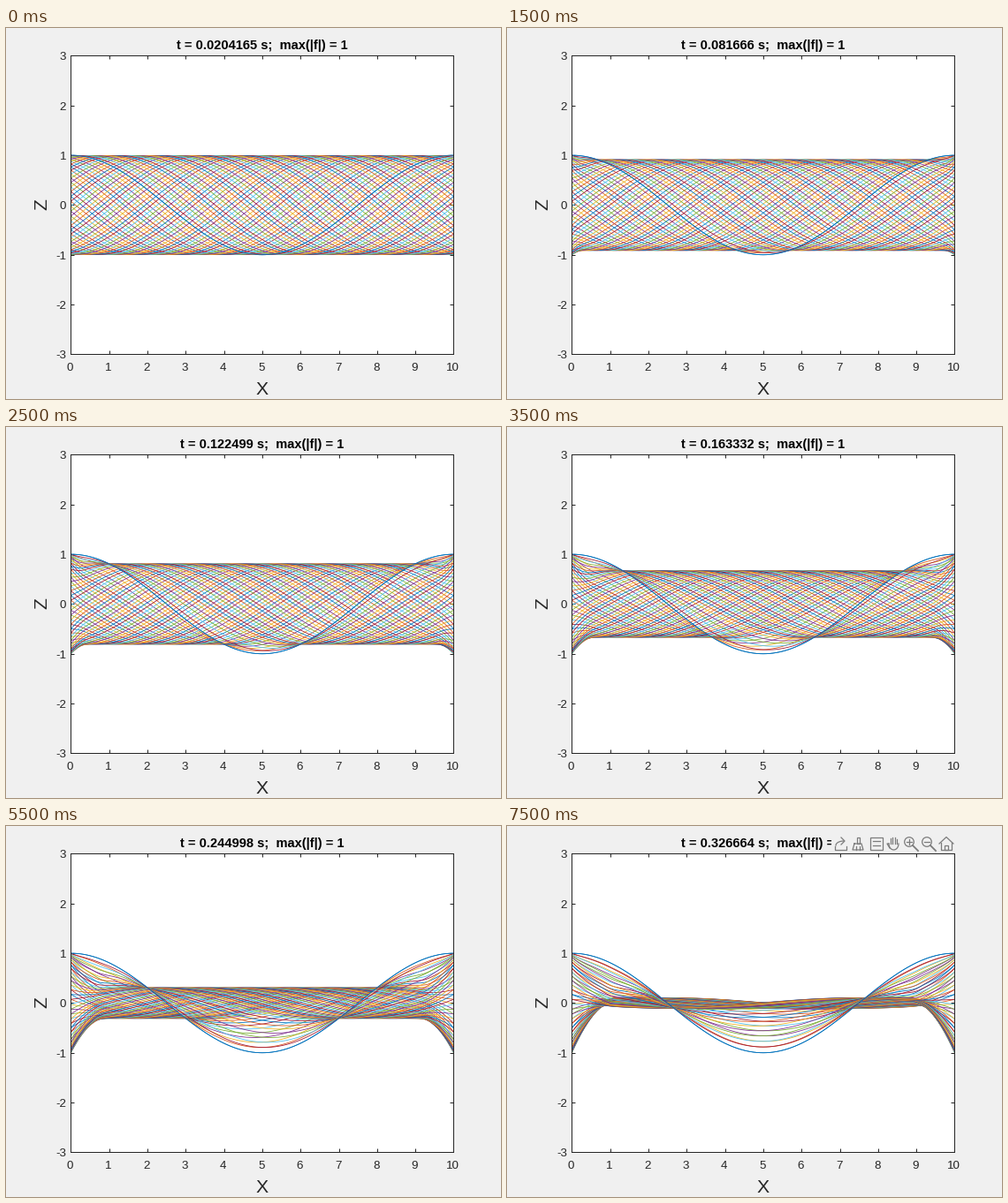
Recreate the animation shown at these times as a matplotlib script. Size 560 by 420 pixels, loop 8000 ms.

```python
import numpy as np
import matplotlib.pyplot as plt
from matplotlib.animation import FuncAnimation
from matplotlib.collections import LineCollection
from matplotlib.patches import Circle, Rectangle

W, H = 560, 420
FRAMES, INTERVAL = 16, 500
DT = 50 / 2449          # time between shown states
SUBSTEPS = 10
SPEED = np.sqrt(40 / 3)
LX, LY = 10, 5
NX, NY = 121, 64
LEFT, RIGHT, TOP, BOTTOM = 73.4, 506.4, 31.4, 369.4
INK, ICON, BACK = "#262626", "#7c7c7c", "#f0f0f0"
COLORS = ["#0072BD", "#D95319", "#EDB120", "#7E2F8E",
          "#77AC30", "#4DBEEE", "#A2142F"]

plt.rcParams["font.family"] = "Liberation Sans"


def solve():
    """Plane wave on a membrane whose rim is held at its starting shape."""
    x = np.linspace(0, LX, NX)
    y = np.linspace(0, LY, NY)
    f = np.cos(2 * np.pi * (x[None, :] / LX + y[:, None] / LY))
    step = SPEED * DT / SUBSTEPS
    ax2 = (step / (x[1] - x[0])) ** 2
    ay2 = (step / (y[1] - y[0])) ** 2

    def bend(g):
        mid = g[1:-1, 1:-1]
        return (ax2 * (g[1:-1, 2:] - 2 * mid + g[1:-1, :-2])
                + ay2 * (g[2:, 1:-1] - 2 * mid + g[:-2, 1:-1]))

    old, now = f, f.copy()
    now[1:-1, 1:-1] += bend(f) / 2
    states = []
    for i in range(1, FRAMES * SUBSTEPS + 1):
        if i % SUBSTEPS == 0:
            states.append(now)
        new = now.copy()
        new[1:-1, 1:-1] += now[1:-1, 1:-1] - old[1:-1, 1:-1] + bend(now)
        old, now = now, new
    return x, states


x, states = solve()

fig = plt.figure(figsize=(W / 100, H / 100), dpi=100, facecolor=BACK)
ax = fig.add_axes([LEFT / W, 1 - BOTTOM / H, (RIGHT - LEFT) / W, (BOTTOM - TOP) / H])
ax.set(xlim=(0, 10), ylim=(-3, 3), xticks=range(11), yticks=range(-3, 4))
ax.tick_params(direction="in", top=True, right=True, length=3.1, width=0.72,
               color=INK, labelbottom=False, labelleft=False)
for spine in ax.spines.values():
    spine.set(color=INK, linewidth=0.72)

waves = LineCollection([], colors=COLORS, linewidths=0.58, zorder=2)
ax.add_collection(waves, autolim=False)

# Overlay in pixel units for text and toolbar
page = fig.add_axes([0, 0, 1, 1], zorder=5)
page.set(xlim=(0, W), ylim=(H, 0))
page.axis("off")


def label(px, py, text, size, ha="center", color=INK, va="baseline", **kw):
    return page.text(px, py, text, fontsize=size * 0.72, ha=ha, va=va,
                     color=color, **kw)


for v in range(11):
    label(LEFT + (RIGHT - LEFT) * v / 10 - 0.9, 388, str(v), 13.33)
for v in range(-3, 4):
    label(68.2, TOP + (BOTTOM - TOP) * (3 - v) / 6 + 5, str(v), 13.33, ha="right")
label(290, 415, "X", 21.33)
label(40.5, 200, "Z", 21.33, rotation=90, va="center")
title = label(290, 24, "", 14.67, weight="bold", color="black")

toolbar = []


def shape(patch):
    toolbar.append(page.add_patch(patch))


def stroke(px, py, lw=0.9):
    toolbar.extend(page.plot(px, py, color=ICON, lw=lw, zorder=7))


def box(px, py, w, h):
    shape(Rectangle((px, py), w, h, fill=False, ec=ICON, lw=0.9, zorder=7))


def export(cx):
    stroke([cx - 6, cx - 6, cx + 7, cx + 7], [23, 27, 27, 23])
    turn = np.linspace(0, np.pi / 2, 12)
    stroke(cx + 4 - 9 * np.cos(turn), 22 - 5 * np.sin(turn))
    stroke([cx + 1, cx + 5, cx + 1], [13, 17, 21])


def brush(cx):
    box(cx - 1.5, 12.5, 3, 7)
    stroke([cx - 4, cx + 4, cx + 6, cx - 6, cx - 4], [20, 20, 27, 27, 20])
    for dx in (-2, 2):
        stroke([cx + dx, cx + dx], [23, 27])


def note(cx):
    box(cx - 6, 12.5, 14, 14.5)
    for py in (17, 22):
        stroke([cx - 3, cx + 5], [py, py])


def hand(cx):
    for i in range(4):
        fx, tip = cx - 3.5 + 2.6 * i, 13 + 0.8 * (i - 1.3) ** 2
        stroke([fx, fx], [tip, 20])
    turn = np.linspace(0, np.pi, 20)
    stroke(cx + 0.5 + 5.5 * np.cos(turn), 20 + 7 * np.sin(turn))
    stroke([cx - 5, cx - 7, cx - 4], [20, 20, 25])


def lens(cx, plus):
    shape(Circle((cx - 2, 18), 5.3, fill=False, ec=ICON, lw=0.9, zorder=7))
    stroke([cx + 2, cx + 8], [22, 28], lw=1.3)
    stroke([cx - 4.6, cx + 0.6], [18, 18])
    if plus:
        stroke([cx - 2, cx - 2], [15.4, 20.6])


def home(cx):
    stroke([cx - 8, cx, cx + 8], [20, 12.5, 20])
    stroke([cx - 6, cx - 6, cx + 6, cx + 6], [18.5, 27, 27, 18.5])
    box(cx - 2, 21.5, 4, 5.5)


shape(Rectangle((367, 11), 142, 18.5, fc=BACK, ec="none", zorder=6))
icons = [export, brush, note, hand,
         lambda c: lens(c, True), lambda c: lens(c, False), home]
for i, icon in enumerate(icons):
    icon(377 + 20 * i)


def update(n):
    f = states[n]
    waves.set_segments([np.column_stack((x, row)) for row in f])
    title.set_text(f"t = {(n + 1) * DT:.6g} s;  max(|f|) = {np.abs(f).max():.4g}")
    for part in toolbar:
        part.set_visible(n == FRAMES - 1)
    return [waves, title, *toolbar]


anim = FuncAnimation(fig, update, frames=FRAMES, interval=INTERVAL,
                     init_func=lambda: update(0), repeat=True, repeat_delay=0)
plt.show()
```
